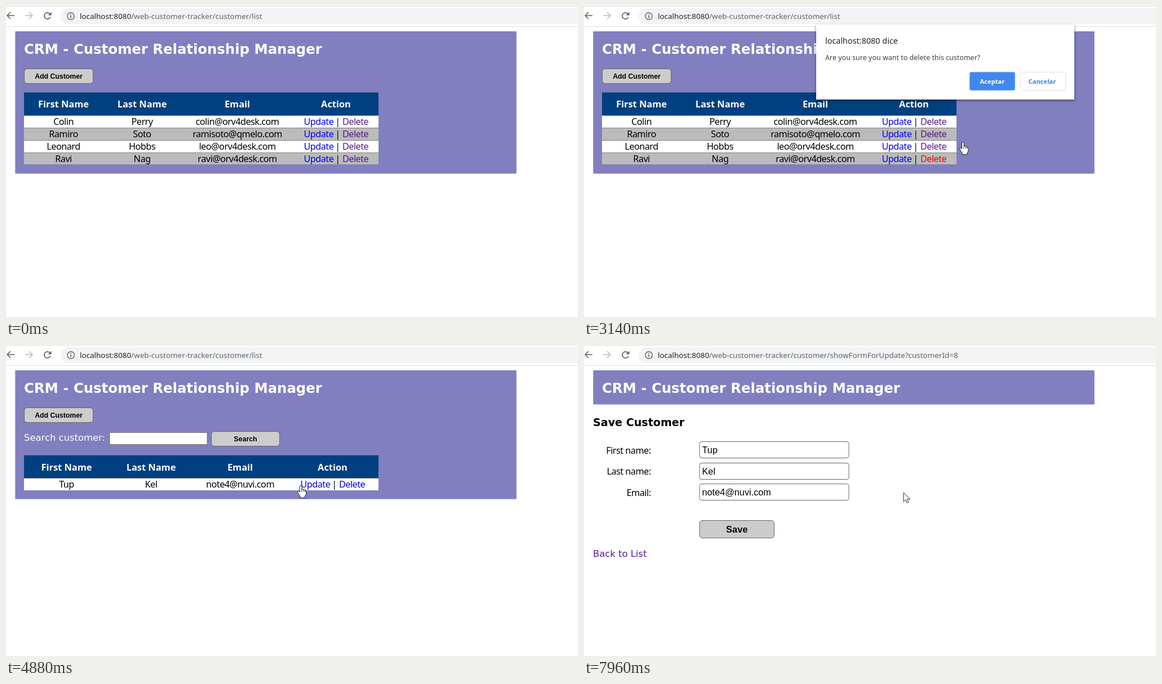
An HTML page with a canvas that plays this animation: 1015 by 552 pixels, repeating every 8 s.

```html
<!DOCTYPE html>
<html lang="en">
<head>
<meta charset="utf-8">
<title>Customer tracker</title>
<style>
html, body { margin: 0; width: 100%; height: 100%; overflow: hidden; background: #fff; }
canvas { display: block; width: 1015px; height: 552px; }
</style>
</head>
<body>
<canvas id="stage"></canvas>
<script>
const W = 1015, H = 552, LOOP = 8000;
const dpr = Math.ceil(window.devicePixelRatio || 1);

function surface(canvas) {
  canvas.width = W * dpr;
  canvas.height = H * dpr;
  const c = canvas.getContext('2d');
  c.scale(dpr, dpr);
  return c;
}

const stage = surface(document.getElementById('stage'));
const layer = surface(document.createElement('canvas'));
let ctx = stage;

const WIDE = '"DejaVu Sans", sans-serif';
const UI = '"Noto Sans", "Open Sans", sans-serif';
const ARIAL = '"Liberation Sans", Arial, sans-serif';
const PURPLE = '#817fbf', NAVY = '#004080', GREY = '#cccccc', RULE = '#808080';
const BLUE = '#0000ee', VISITED = '#551a8b', RED = '#ff0000', ICON = '#5f6368';

const PRESS_DELETE = 2640, OPEN = 2760, SHOWN = 2910;
const CLOSE = 3740, CLOSED = 3900, RELOAD = 3830;
const PRESS_UPDATE = 7090, SHOW_FORM = 7240;
const loading = [[3780, 3860], [7190, 7340]];

const people = [
  ['Colin', 'Perry', 'colin@orv4desk.com'],
  ['Ramiro', 'Soto', 'ramisoto@qmelo.com'],
  ['Leonard', 'Hobbs', 'leo@orv4desk.com'],
  ['Ravi', 'Nag', 'ravi@orv4desk.com']
];
const entry = ['Tup', 'Kel', 'note4@nuvi.com'];

// time, hotspot x, hotspot y, pointer shape
const track = [
  [90, 851, 526, 'arrow'], [300, 570, 335, 'arrow'], [520, 340, 187, 'arrow'],
  [700, 250, 150, 'arrow'], [880, 189, 182, 'arrow'], [1000, 160, 182, 'arrow'],
  [1250, 115, 150, 'arrow'], [1490, 103, 134, 'arrow'], [1740, 103, 134, 'arrow'],
  [1975, 360, 222, 'arrow'], [2110, 545, 273, 'hand'],
  [2210, 591, 274, 'beam'], [2390, 591, 274, 'beam'], [2490, 609, 272, 'hand'],
  [3070, 609, 272, 'hand'], [3140, 672, 242, 'hand'], [3300, 706, 190, 'hand'],
  [3480, 719, 143, 'arrow'], [3680, 723, 129, 'arrow'], [3890, 723, 129, 'arrow'],
  [4280, 635, 176, 'arrow'], [4680, 522, 222, 'arrow'], [4770, 496, 238, 'arrow'],
  [4880, 523, 249, 'hand'], [5050, 523, 249, 'hand'], [5170, 460, 239, 'beam'],
  [5320, 460, 239, 'beam'], [5550, 555, 255, 'hand'], [5730, 555, 255, 'hand'],
  [5980, 600, 253, 'hand'], [6180, 600, 253, 'hand'], [6380, 587, 251, 'beam'],
  [6730, 587, 251, 'beam'], [6800, 569, 248, 'hand'], [7840, 569, 248, 'hand'],
  [7960, 567, 262, 'arrow'], [LOOP, 567, 262, 'arrow']
];

function rect(x, y, w, h, fill) {
  ctx.fillStyle = fill;
  ctx.fillRect(x, y, w, h);
}

function box(x, y, w, h, r, fill, stroke) {
  ctx.beginPath();
  ctx.roundRect(x + 0.5, y + 0.5, w - 1, h - 1, r);
  ctx.fillStyle = fill;
  ctx.fill();
  if (stroke) {
    ctx.lineWidth = 1;
    ctx.strokeStyle = stroke;
    ctx.stroke();
  }
}

function line(points, color, width) {
  ctx.beginPath();
  points.forEach(([x, y]) => ctx.lineTo(x, y));
  ctx.strokeStyle = color;
  ctx.lineWidth = width;
  ctx.stroke();
}

function text(s, x, y, font, color, align = 'left', spacing = 0) {
  ctx.font = font;
  ctx.fillStyle = color;
  ctx.textAlign = align;
  ctx.letterSpacing = spacing + 'px';
  ctx.fillText(s, x, y);
}

const cell = (s, x, y, color = '#000', align = 'center') =>
  text(s, x, y, '16.2px ' + UI, color, align, -0.5);

function button(label, x, y, w, h, size) {
  box(x, y, w, h, 5, GREY, '#666');
  text(label, x + w / 2, y + h / 2 + size * 0.36, `bold ${size}px ${ARIAL}`, '#000', 'center');
}

function reloadIcon() {
  ctx.beginPath();
  ctx.arc(73.5, 17.5, 5.6, 0.35, Math.PI * 1.78);
  ctx.strokeStyle = ICON;
  ctx.lineWidth = 1.7;
  ctx.stroke();
  ctx.beginPath();
  ctx.moveTo(80.5, 10.5);
  ctx.lineTo(80.5, 16.5);
  ctx.lineTo(74.5, 16.5);
  ctx.fillStyle = ICON;
  ctx.fill();
}

function stopIcon() {
  line([[68.5, 12.5], [78.5, 22.5]], ICON, 1.7);
  line([[78.5, 12.5], [68.5, 22.5]], ICON, 1.7);
}

function toolbar(path, busy) {
  rect(0, 0, W, 1, '#dfe1e5');
  rect(0, 36, W, 1, '#dcdee1');
  ctx.beginPath();
  ctx.roundRect(97, 4, W, 28, 14);
  ctx.fillStyle = '#f1f3f4';
  ctx.fill();
  line([[15, 17], [2.5, 17]], ICON, 1.6);
  line([[8, 11], [2, 17], [8, 23]], ICON, 1.6);
  line([[34, 17], [46.5, 17]], '#babcbe', 1.6);
  line([[41, 11], [47, 17], [41, 23]], '#babcbe', 1.6);
  if (busy) stopIcon();
  else reloadIcon();
  ctx.beginPath();
  ctx.arc(115, 18, 6.2, 0, Math.PI * 2);
  ctx.strokeStyle = ICON;
  ctx.lineWidth = 1.4;
  ctx.stroke();
  rect(114.2, 17, 1.6, 4.5, ICON);
  rect(114.2, 14.3, 1.6, 1.6, ICON);
  const host = 'localhost:8080', font = '13.45px ' + UI;
  text(host, 131, 23, font, '#202124');
  text(path, 131 + ctx.measureText(host).width, 23, font, ICON);
}

function banner(height) {
  rect(16.3, 45, 889.5, height, PURPLE);
  text('CRM - Customer Relationship Manager', 32, 85, 'bold 24.35px ' + WIDE, '#fff');
}

function tableHead(y, centers) {
  rect(32, y, 629, 41, NAVY);
  rect(32, y, 629, 0.5, RULE);
  ['First Name', 'Last Name', 'Email', 'Action'].forEach((s, i) =>
    text(s, centers[i], y + 27, 'bold 16.4px ' + UI, '#fff', 'center'));
}

function tableRow(y, centers, values, fill, h, update, del) {
  rect(32, y, 629, h, fill);
  rect(32, y, 629, 1, RULE);
  values.forEach((s, i) => cell(s, centers[i], y + 17));
  const x = centers[3];
  cell('Update', x - 57, y + 17, update, 'left');
  cell('|', x + 3, y + 17);
  cell('Delete', x + 11.5, y + 17, del, 'left');
}

function fullList(t) {
  const centers = [102, 241.5, 410.5, 585.5];
  banner(252.5);
  button('Add Customer', 32, 111, 123, 27, 12.3);
  tableHead(153, centers);
  people.forEach((p, i) => {
    const pressed = i === 3 && t >= PRESS_DELETE;
    tableRow(194 + 22 * i, centers, p, i % 2 ? '#bbbbbb' : '#fff', i === 3 ? 21 : 22,
      BLUE, pressed ? RED : VISITED);
  });
}

function shortList(t) {
  const centers = [107.5, 257.5, 415.5, 579.5];
  banner(228.5);
  button('Add Customer', 32, 111, 123, 27, 12.3);
  text('Search customer:', 32, 170, '16.4px ' + WIDE, '#fff');
  box(183.5, 155, 174, 22, 0, '#fff', '#767676');
  button('Search', 364, 153, 122, 27, 12.4);
  tableHead(195.5, centers);
  tableRow(236, centers, entry, '#fff', 22, t >= PRESS_UPDATE ? RED : BLUE, BLUE);
}

function form() {
  banner(60.5);
  text('Save Customer', 16, 144, 'bold 19.1px ' + WIDE, '#000');
  ['First name:', 'Last name:', 'Email:'].forEach((s, i) => {
    const y = 171 + 37.5 * i;
    cell(s, 118.5, y + 21.5, '#000', 'right');
    box(204.5, Math.round(y), 266, 30, 4, '#fff', '#666');
    text(entry[i], 209.5, y + 21, '16.3px ' + ARIAL, '#000');
  });
  button('Save', 204.5, 311, 133.5, 32, 16.4);
  text('Back to List', 16, 376, '16.4px ' + WIDE, VISITED);
}

function paintDialog() {
  ctx.save();
  ctx.shadowColor = 'rgba(0,0,0,.5)';
  ctx.shadowBlur = 5 * dpr;
  ctx.shadowOffsetY = 1.5 * dpr;
  rect(412, 33, 458, 133, '#fff');
  ctx.restore();
  text('localhost:8080 dice', 428, 66.5, '14.4px ' + UI, '#202124');
  text('Are you sure you want to delete this customer?', 428, 95.5, '12.5px ' + UI, '#3c4043');
  box(683, 116, 83, 35, 4, '#c3daf9');
  box(684, 117, 81, 33, 3, '#3f88ee');
  text('Aceptar', 724.5, 137.5, '600 11.2px ' + UI, '#fff', 'center');
  box(773, 117, 82, 33, 4, '#fff', '#dfe1e5');
  text('Cancelar', 813, 137.5, '600 11.2px ' + UI, '#3f82e6', 'center');
}

// While fading, the dialog is raised and tilted: narrow top, wide bottom
function dialog(alpha) {
  const k = 1 - alpha, lift = Math.round(19 * k), middle = 641;
  ctx.save();
  ctx.globalAlpha = alpha;
  for (let y = 25; y < 180; y++) {
    const grow = k * (-1 + 3.5 * (y - 33) / 133) / 229;
    ctx.drawImage(layer.canvas, 0, y * dpr, W * dpr, dpr,
      -middle * grow, y - lift, W * (1 + grow), 1);
  }
  ctx.restore();
}

const arrowShape = new Path2D(
  'M0 0V16.2L3.7 12.7L6.2 18.2L8.8 17.1L6.4 11.7H11.5Z');
const handShape = new Path2D(
  'M-1.8 1.5Q-1.6 0 0 0Q1.7 0 1.8 1.6V7Q4.3 5.8 5 7.6Q7.3 6.8 7.7 8.8' +
  'Q9.7 8.3 9.7 10.6V14Q9.7 17 7.6 19V22H-1V19.5Q-3.5 16.5 -5.5 12.8' +
  'Q-6.4 10.6 -4.6 10.3Q-3.3 10.2 -1.8 12.2Z');
const fingers = new Path2D('M1.8 7V11.5M5 7.6V11.5M7.7 8.8V12');
const beamShape = new Path2D('M-4 -8.5H-1.2L0 -7.5L1.2 -8.5H4M0 -7.5V7.5M-4 8.5H-1.2L0 7.5L1.2 8.5H4');

function pointer(x, y, kind) {
  ctx.save();
  ctx.translate(x, y);
  ctx.lineJoin = 'round';
  ctx.lineWidth = 1;
  ctx.strokeStyle = '#222';
  ctx.fillStyle = '#fff';
  if (kind === 'beam') {
    ctx.stroke(beamShape);
  } else {
    const shape = kind === 'hand' ? handShape : arrowShape;
    ctx.fill(shape);
    ctx.stroke(shape);
    if (kind === 'hand') ctx.stroke(fingers);
  }
  ctx.restore();
}

// Velocity at a key; zero where the pointer rests
function slope(i, axis) {
  const a = track[Math.max(i - 1, 0)], b = track[i], c = track[Math.min(i + 1, track.length - 1)];
  const still = (p, q) => p !== q && p[1] === q[1] && p[2] === q[2];
  if (still(a, b) || still(b, c)) return 0;
  return (c[axis] - a[axis]) / (c[0] - a[0]);
}

function movePointer(t) {
  if (t < track[0][0]) return;
  let i = 0;
  while (i < track.length - 2 && track[i + 1][0] <= t) i++;
  const a = track[i], b = track[i + 1], span = b[0] - a[0];
  const u = (t - a[0]) / span, v = 1 - u;
  const at = axis =>
    (1 + 2 * u) * v * v * a[axis] + u * u * (3 - 2 * u) * b[axis] +
    span * (u * v * v * slope(i, axis) - u * u * v * slope(i + 1, axis));
  pointer(at(1), at(2), u < 0.5 ? a[3] : b[3]);
}

function draw(t) {
  rect(0, 0, W, H, '#fff');
  const onForm = t >= SHOW_FORM;
  const path = '/web-customer-tracker/customer/' +
    (onForm ? 'showFormForUpdate?customerId=8' : 'list');
  toolbar(path, loading.some(([from, to]) => t >= from && t < to));
  if (onForm) form();
  else if (t >= RELOAD) shortList(t);
  else fullList(t);
  const alpha = Math.min(1, (t - OPEN) / (SHOWN - OPEN), (CLOSED - t) / (CLOSED - CLOSE));
  if (alpha > 0) dialog(alpha);
  movePointer(t);
}

ctx = layer;
paintDialog();
ctx = stage;

const start = performance.now();
function tick() {
  draw((performance.now() - start) % LOOP);
  requestAnimationFrame(tick);
}
tick();
</script>
</body>
</html>
```
